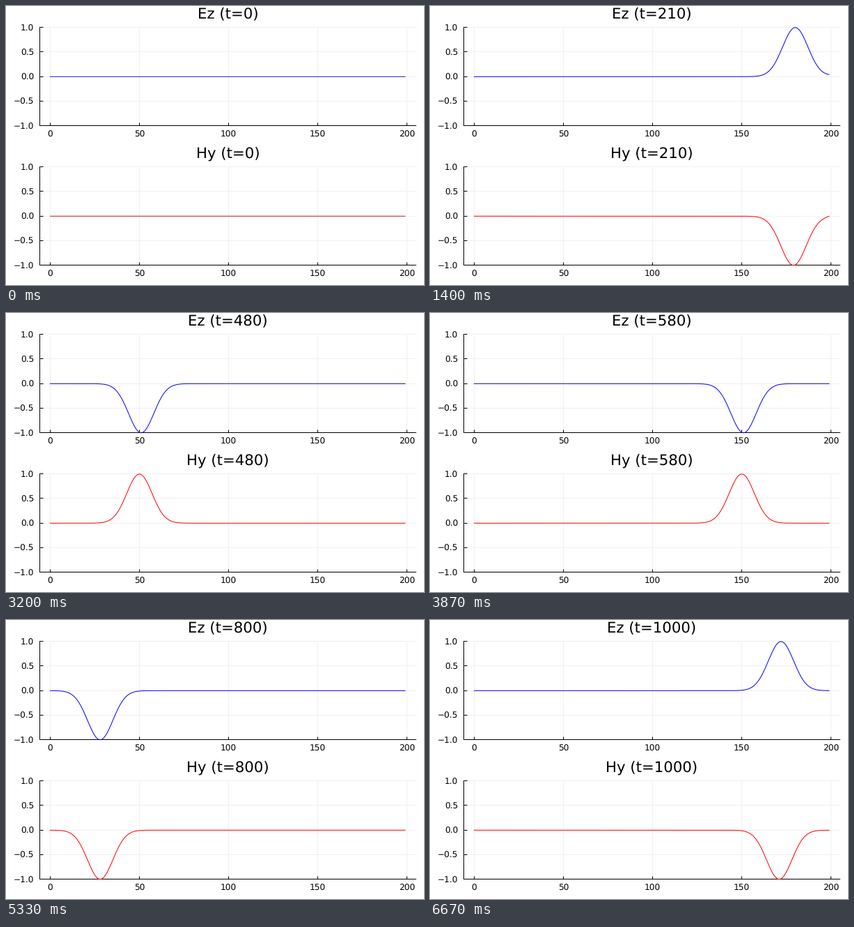
These frames come from a looping animation (600 px wide and 400 px high, 6740 ms). A matplotlib script:

```python
import numpy as np
import matplotlib
import matplotlib.pyplot as plt
from matplotlib.animation import FuncAnimation
from matplotlib.transforms import ScaledTranslation

matplotlib.rcParams.update({
    "font.family": "DejaVu Sans",
    "text.hinting": "no_hinting",
    "text.kerning_factor": 0,
})

W, H, DPI = 600, 400, 100
PX = 72 / DPI                    # points per pixel
CELLS, STEPS, STRIDE = 200, 101, 10
LOOP_MS, TICK_MS, FPS = 6740, 20, 15
LEFT, RIGHT, TOP, HEIGHT = 48.5, 588.2, 30.2, 141
XLIM = (-5.85, 204.97)
TITLE_SIZE, TICK_SIZE = 21.3 * PX, 12.17 * PX
TITLE_CELL = 120                 # cell below the right edge of the titles


def simulate():
    """One-dimensional Yee scheme at the magic time step, pulse fed in at cell 0."""
    ez, hy = np.zeros(CELLS), np.zeros(CELLS)
    states = []
    for t in range((STEPS - 1) * STRIDE + 1):
        hy[:-1] += ez[1:] - ez[:-1]
        ez[1:] += hy[1:] - hy[:-1]
        ez[0] = np.exp(-(t - 30) ** 2 / 100)
        if t % STRIDE == 0:
            states.append((ez.copy(), hy.copy()))
    return states


def text_at(x, y, s, size, ha="center"):
    return fig.text(x / W, 1 - y / H, s, fontsize=size, ha=ha, va="baseline")


class Panel:
    def __init__(self, name, y0, color, rest_color):
        self.name = name
        bottom = y0 + TOP + HEIGHT
        ax = fig.add_axes([LEFT / W, 1 - bottom / H, (RIGHT - LEFT) / W, HEIGHT / H])
        ax.set(xlim=XLIM, ylim=(-1, 1), facecolor="none")
        ax.set_xticks(range(0, 201, 50))
        ax.set_yticks(np.arange(-1, 1.1, 0.5))
        ax.set_axisbelow(True)
        ax.grid(color="#f0f0f0", linewidth=PX)
        ax.tick_params(direction="in", length=4.5 * PX, width=PX,
                       labelbottom=False, labelleft=False)
        for side, spine in ax.spines.items():
            spine.set_visible(side in ("left", "bottom"))
            spine.set(linewidth=PX, zorder=1)

        scale = (RIGHT - LEFT) / (XLIM[1] - XLIM[0])
        for v in range(0, 201, 50):
            text_at(LEFT + (v - XLIM[0]) * scale, bottom + 16.6, str(v), TICK_SIZE)
        for v in np.arange(-1, 1.1, 0.5):
            y = y0 + TOP + (1 - v) / 2 * HEIGHT
            label = f"{v:.1f}".replace("-", "\u2212")
            text_at(40.2, y + 5.2, label, TICK_SIZE, "right")

        self.title = text_at((LEFT + RIGHT) / 2, y0 + 18.4, "", TITLE_SIZE)
        # curves are not snapped, so bring them onto the snapped grid
        nudge = ScaledTranslation(0, -0.6 / DPI, fig.dpi_scale_trans)
        style = dict(linewidth=PX, snap=False, clip_on=False,
                     transform=ax.transData + nudge)
        self.rest, = ax.plot([], [], color=rest_color, **style)
        self.wave, = ax.plot([], [], color=color, **style)

    def show(self, t, field):
        # the stretch the pulse has not reached yet keeps its darker tone
        front = min(max(TITLE_CELL, t), CELLS - 1) if t else 0
        cells = np.arange(CELLS)
        self.wave.set_data(cells[:front + 1], field[:front + 1])
        self.rest.set_data(cells[front:], field[front:])
        self.title.set_text(f"{self.name} (t={t})")
        return self.wave, self.rest, self.title


fig = plt.figure(figsize=(W / DPI, H / DPI), dpi=DPI, facecolor="white")
panels = [Panel("Ez", 0, "#0000ff", "#1c1cc0"),
          Panel("Hy", 200, "#ff0000", "#c01c38")]
states = simulate()


def draw(tick):
    # 15 steps a second on a 20 ms clock: each step holds 3, 3, then 4 ticks
    step = min((tick * TICK_MS + 14) * FPS // 1000, STEPS - 1)
    artists = []
    for panel, field in zip(panels, states[step]):
        artists += panel.show(step * STRIDE, field)
    return artists


anim = FuncAnimation(fig, draw, frames=LOOP_MS // TICK_MS,
                     init_func=lambda: draw(0), interval=TICK_MS,
                     repeat=True, repeat_delay=0)
plt.show()
```
